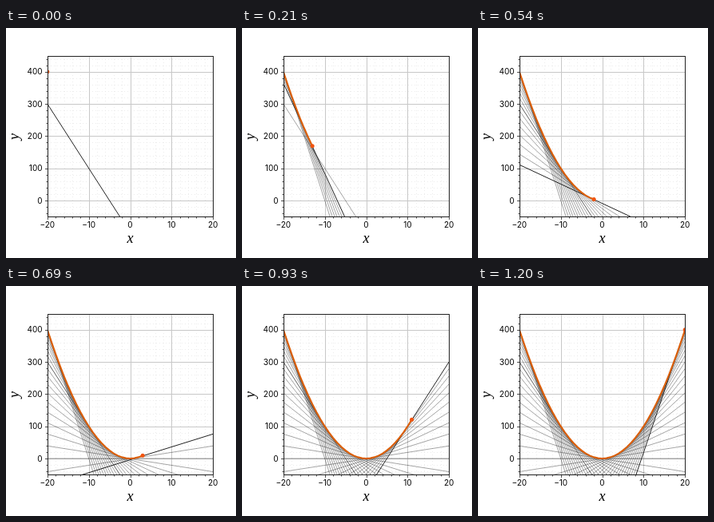
Recreate the animation shown at these times as an HTML page. Size 288x288 px, loop 1.53 s.

```html
<!DOCTYPE html>
<html lang="en">
<head>
<meta charset="utf-8">
<title>Tangents of a parabola</title>
<style>
  html, body { margin: 0; width: 100%; height: 100%; overflow: hidden; background: #fff; }
  svg { display: block; width: 100%; height: 100%; }
  .tick { font: 10px Inter, "Liberation Sans", sans-serif; }
  .name { font: italic 18px "Liberation Serif", serif; text-anchor: middle; }
  .mid { text-anchor: middle; }
  .end { text-anchor: end; }
  .minor { stroke: #e4e4e4; stroke-width: .7; stroke-dasharray: 1 3; }
  .major { stroke: #c8c8c8; }
  .mark { stroke: #222; stroke-width: .8; }
  .ghost { stroke: #000; stroke-width: .6; opacity: .6; }
  .tangent { stroke: #222; stroke-width: 1; }
  .curve { fill: none; stroke: #dc5f08; stroke-width: 2.1; stroke-linejoin: round; }
  .dot { fill: #f2540f; }
  .frame { fill: none; stroke: #222; }
</style>
</head>
<body>
<svg viewBox="0 0 288 288">
  <clipPath id="box"><rect x="51.84" y="34.56" width="207.36" height="201.6"/></clipPath>
  <g id="grid"></g>
  <g clip-path="url(#box)">
    <g id="ghosts"></g>
    <line id="tangent" class="tangent"/>
    <polyline id="curve" class="curve"/>
    <circle id="dot" class="dot" r="2.5"/>
  </g>
  <g id="axes"></g>
  <rect class="frame" x="52.5" y="35.5" width="207" height="201"/>
  <text class="name" x="155.5" y="269">x</text>
  <text class="name" transform="translate(16 136) rotate(-90)">y</text>
</svg>
<script>
const STEP = 30, LAST = 40, LOOP = 1530, START = -20, FIRST_TANGENT = -10;
const $ = id => document.getElementById(id);
const px = x => 155.52 + 5.184 * x;
const py = y => 216 - 0.4032 * y;
const snap = v => Math.floor(v + 0.5) + 0.5;

function set(el, attrs) {
  for (const k in attrs) el.setAttribute(k, attrs[k]);
  return el;
}
function add(parent, tag, attrs) {
  const el = document.createElementNS("http://www.w3.org/2000/svg", tag);
  return parent.appendChild(set(el, attrs));
}
function line(parent, cls, x1, y1, x2, y2) {
  return add(parent, "line", { class: cls, x1, y1, x2, y2 });
}
function label(value, cls, x, y) {
  add($("axes"), "text", { class: "tick " + cls, x, y })
    .textContent = String(value).replace("-", "\u2212");
}

// Ends of the tangent to y = x² at x = a
const tangentAt = a => ({
  x1: px(-20), y1: py(-40 * a - a * a),
  x2: px(20), y2: py(40 * a - a * a)
});

function drawGrid(major) {
  const cls = major ? "major" : "minor", len = major ? 3.5 : 2;
  for (let x = -20; x <= 20; x += 2) {
    if ((x % 10 === 0) !== major) continue;
    const X = snap(px(x));
    if (Math.abs(x) < 20) line($("grid"), cls, X, 35, X, 236);
    line($("axes"), "mark", X, 236.5, X, 236.5 + len);
    if (major) label(x, "mid", px(x), 250.3);
  }
  for (let y = -40; y <= 440; y += 20) {
    if ((y % 100 === 0) !== major) continue;
    const Y = snap(py(y));
    line($("grid"), cls, 52, Y, 259, Y);
    line($("axes"), "mark", 52.5 - len, Y, 52.5, Y);
    if (major) label(y, "end", 45.5, py(y) + 3.7);
  }
}
drawGrid(false);
drawGrid(true);

// Tangents in the order they are drawn; the newest is dark, older ones fade
const slopes = [FIRST_TANGENT], points = [];
for (let k = 0; k < LAST; k++) slopes.push(START + k);
for (let x = START; x <= START + LAST; x++) points.push(px(x) + "," + py(x * x));
const ghosts = slopes.map(a => add($("ghosts"), "line", { class: "ghost", ...tangentAt(a) }));

let shown = -1;
function render(k) {
  if (k === shown) return;
  shown = k;
  const x = START + k;
  ghosts.forEach((g, i) => { g.style.display = i < k ? "" : "none"; });
  set($("tangent"), tangentAt(slopes[k]));
  set($("curve"), { points: points.slice(0, k + 1).join(" ") });
  set($("dot"), { cx: px(x), cy: py(x * x) });
}

const t0 = performance.now();
function tick() {
  const t = (performance.now() - t0) % LOOP;
  render(Math.min(LAST, Math.floor(t / STEP)));
  requestAnimationFrame(tick);
}
tick();
</script>
</body>
</html>
```
